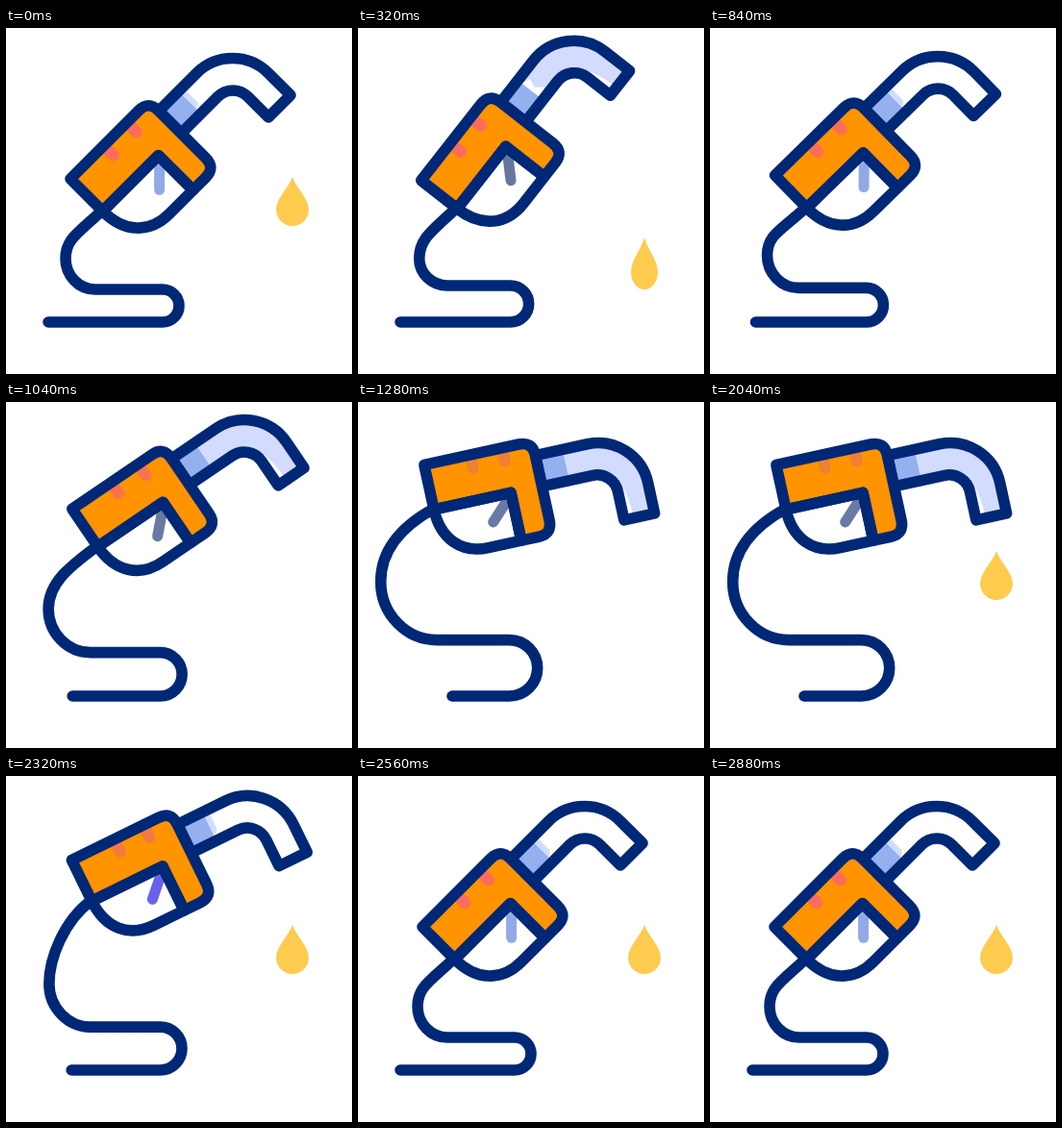
These frames come from a looping animation (360x360 px, 3000 ms). An HTML page with a canvas:

```html
<!DOCTYPE html>
<html lang="en">
<head>
<meta charset="utf-8">
<title>Fuel nozzle</title>
<style>
html, body { margin: 0; width: 100%; height: 100%; overflow: hidden; background: #fff; }
canvas { display: block; width: 100vmin; height: 100vmin; }
</style>
</head>
<body>
<canvas id="stage" width="360" height="360"></canvas>
<script>
const ctx = document.getElementById('stage').getContext('2d');
const LOOP = 3000, STEP = 40, SWING = 480;
const NAVY = '#002876', ORANGE = '#ff9300', BLUE = '#95b0ee', PALE = '#d3dcff', YELLOW = '#fecb4f';
const PIVOT = { x: 223, y: 111 };
const BASE = { x: 67, y: 157 };

const clamp = v => Math.max(0, Math.min(1, v));
const lerp = (a, b, k) => a + (b - a) * k;
const phase = (t, start, length = SWING) => clamp((t - start) / length);
const arch = k => Math.sin(Math.PI * k);
const smooth = k => k * k * (3 - 2 * k);

function poseAt(t) {
  const hop = arch(phase(t, 160));
  const down = phase(t, 800), up = phase(t, 2040);
  const lift = arch(down ** 1.3) + arch(up ** 1.3);
  const hose = down ** 1.1 - up ** 1.1;
  const turn = down ** 1.6 - up ** 1.6;
  return {
    hop, hose, turn,
    angle: (turn * 32.7 - hop * 8) * Math.PI / 180,
    dx: 7 * lift - 9.2 * hop + 2 * hose,
    dy: -16.5 * lift - 19.5 * hop
  };
}

// Stage position of a point given in the resting pose.
function place(pose, x, y) {
  const c = Math.cos(pose.angle), s = Math.sin(pose.angle);
  const rx = x - PIVOT.x, ry = y - PIVOT.y;
  return [PIVOT.x + pose.dx + rx * c - ry * s, PIVOT.y + pose.dy + rx * s + ry * c];
}

function outline(path, width = 11.6, color = NAVY) {
  ctx.lineWidth = width;
  ctx.strokeStyle = color;
  ctx.stroke(path);
}

function fill(path, color) {
  ctx.fillStyle = color;
  ctx.fill(path);
}

const body = new Path2D('M0 0H100.5Q115 0 115 14.5V84Q115 98.5 100.5 98.5H82V47.5H0Z');
const guard = new Path2D('M0 47.5H82V98.5H47C18 98.5 0 79 0 47.5Z');
const spout = new Path2D('M115 15H170.5A53 53 0 0 1 223.5 68V100.4H191V70A22 22 0 0 0 169 48H115Z');
const band = new Path2D('M115 15H144V48H115Z');
const patch = new Path2D('M144 20H150V38L146 41H144Z');
const gap = new Path2D('M144 20L153 24L149 33L155 40L151 45H144Z');
const sliver = new Path2D('M190 60Q198 72 198 94');
const marks = new Path2D('M49 4V14M83 4V14');
const trigger = new Path2D('M79 52L57.5 73.5');
const drop = new Path2D('M0 -25.5C4 -14 17 -3 17 8.5A17 17 0 0 1 -17 8.5C-17 -3 -4 -14 0 -25.5Z');

function drawHose(pose) {
  const { hop, hose: p } = pose;
  const [sx, sy] = place(pose, 100, 190);
  const left = lerp(62, 23.7, p) + 2 * hop, side = lerp(240, 187, p);
  const mid = lerp(272, 247.6, p) - 4.6 * hop;
  const turnX = lerp(93, 82, p), bendX = lerp(163, 157.5, p) - 5 * hop;
  const r = (306 - mid) / 2, k = 0.45;
  const path = new Path2D();
  path.moveTo(sx, sy);
  path.bezierCurveTo(sx - lerp(27, 31, p), sy + lerp(25, 17, p), left, side - lerp(20, 35, p), left, side);
  path.bezierCurveTo(left, lerp(mid, side, k), lerp(turnX, left, 1 - k), mid, turnX, mid);
  path.lineTo(bendX, mid);
  path.arc(bendX, mid + r, r, -Math.PI / 2, Math.PI / 2);
  path.lineTo(lerp(44, 98, p), 306);
  outline(path);
}

function drawDrop(t) {
  let x = 298, y = 180.5, w = 1, h = 1;
  if (t < 700) {
    const k = phase(t, 160) * 3;
    y += 64.5 * k ** 1.7;
    w = 1 - 0.18 * Math.min(1, k);
    h = 1 + 0.06 * Math.min(1, k);
  } else {
    const k = smooth(phase(t, 1300, 520));
    if (!k) return;
    x = lerp(293, 298, k);
    y = lerp(118, 180.5, k);
    w = h = k;
  }
  ctx.save();
  ctx.translate(x, y);
  ctx.scale(w, h);
  fill(drop, YELLOW);
  ctx.restore();
}

function triggerColor(t) {
  if (t > 160 && t < 680) return '#68769f';
  if (t >= 1040 && t < 2160) return '#6b7aa4';
  if (t >= 2160 && t < 2520) return '#6a60ee';
  return '#92a9e8';
}

function drawNozzle(pose, t) {
  const hopping = t > 160 && t < 680;
  const filled = hopping || (t >= 1040 && t < 2160);
  ctx.save();
  ctx.translate(PIVOT.x + pose.dx, PIVOT.y + pose.dy);
  ctx.rotate(pose.angle);
  ctx.translate(BASE.x - PIVOT.x, BASE.y - PIVOT.y);
  ctx.rotate(-Math.PI / 4);

  fill(spout, filled ? PALE : '#fff');
  if (filled) outline(sliver, 6, '#fff');
  if (hopping) fill(gap, '#fff');
  if (!filled) fill(patch, PALE);
  fill(band, BLUE);
  outline(spout);

  fill(guard, '#fff');
  outline(trigger, 11, triggerColor(t));
  fill(body, ORANGE);
  const k = pose.turn;
  outline(marks, 12, `rgb(${lerp(255, 238, k)}, ${lerp(107, 129, k)}, ${lerp(90, 50, k)})`);
  outline(guard);
  outline(body);
  ctx.restore();
}

function draw(now) {
  const t = Math.floor((now % LOOP) / STEP) * STEP;
  const pose = poseAt(t);
  ctx.fillStyle = '#fff';
  ctx.fillRect(0, 0, 360, 360);
  ctx.lineCap = ctx.lineJoin = 'round';
  drawDrop(t);
  drawHose(pose);
  drawNozzle(pose, t);
}

let start = null;
function tick(now) {
  if (start === null) start = now;
  draw(Math.max(0, now - start));
  requestAnimationFrame(tick);
}
draw(0);
requestAnimationFrame(tick);
</script>
</body>
</html>
```
